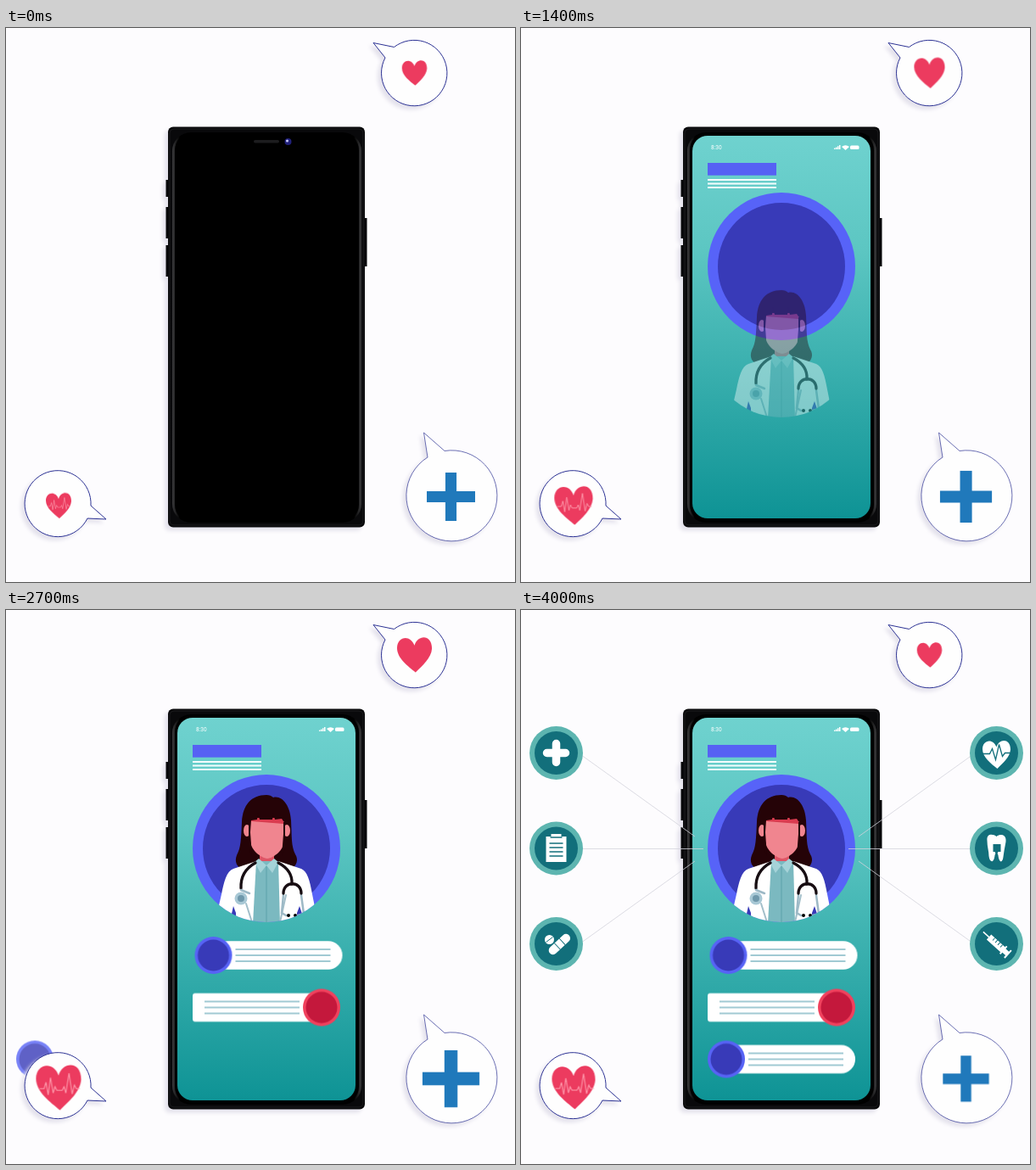
Recreate the animation shown at these times as an HTML page. Size 600 by 653 pixels, loop 4100 ms.

```html
<!DOCTYPE html>
<html lang="en">
<head>
<meta charset="utf-8">
<title>Health app</title>
<style>
  html, body { margin: 0; width: 100%; height: 100%; overflow: hidden; background: #fdfcfe; }
  svg { display: block; width: 600px; height: 653px; }
  .shade { filter: drop-shadow(-4px 4px 2px #e4e2ec); }
  .bubble { fill: #fefefe; stroke: #2b3193; stroke-linejoin: round; }
  .heart { fill: #ec3b5f; }
  .rule { fill: none; stroke: #4595a8; stroke-width: 1.2; }
  .rays { stroke: #d3d3dc; stroke-width: .8; }
  .white { fill: #fff; }
  .ring { fill: #5db5b0; }
  .core { fill: #126f7b; }
  .cut { fill: none; stroke: #126f7b; }
  .hair { fill: #250307; }
</style>
</head>
<body>
<svg viewBox="0 0 600 653">
  <defs>
    <linearGradient id="sea" x2="0" y2="1">
      <stop stop-color="#6fd2cf"/>
      <stop offset=".3" stop-color="#5cc6c2"/>
      <stop offset="1" stop-color="#0e9395"/>
    </linearGradient>
    <linearGradient id="rim">
      <stop stop-color="#3a3a3c"/>
      <stop offset=".04" stop-color="#000"/>
      <stop offset=".96" stop-color="#000"/>
      <stop offset="1" stop-color="#3a3a3c"/>
    </linearGradient>
    <clipPath id="disc"><circle cx="307" cy="281" r="87"/></clipPath>
    <path id="heart" d="M3 50C-18 32-50 10-50-20C-50-53-12-60 0-27C7-57 50-62 50-18C48 10 22 31 3 50Z"/>
  </defs>

  <!-- Phone -->
  <g class="shade">
    <path d="M188.500 179h5v20h-5zM188.500 211h5v37h-5zM188.500 256h5v37h-5zM421 224h4.500v57h-4.500z" fill="#08080a"/>
    <rect x="191" y="116.500" width="232" height="472" rx="6" fill="#09090b"/>
  </g>
  <rect x="193" y="119" width="228" height="467" rx="5" fill="none" stroke="#1c1c1e"/>
  <rect x="196" y="123" width="223" height="460" rx="22" fill="url(#rim)"/>
  <rect x="199" y="124" width="217" height="458" rx="20"/>
  <rect x="292" y="132" width="30" height="3.500" rx="1.700" fill="#1d1d1f"/>
  <circle cx="332.500" cy="134" r="4" fill="#20207a"/>
  <circle cx="331.500" cy="133" r="1.500" fill="#c9cbff"/>

  <g id="screen">
    <rect x="202" y="127" width="210" height="451" rx="18" fill="url(#sea)"/>
    <text x="224" y="143.300" font-family="Roboto, sans-serif" font-size="6.500" class="white">8:30</text>
    <path class="white" d="M369 143v-1.500h1.500v1.500zM371 143v-2.500h1.500v2.500zM373 143v-3.700h1.500v3.700zM375 143v-5h1.500v5zM378 140q4.500-3.500 9 0l-4.500 4z"/>
    <rect class="white" x="388" y="138.500" width="10.500" height="4.500" rx="1.500"/>
  </g>
  <g transform="translate(220 0)"><g id="title">
    <rect y="159" width="81" height="14.700" fill="#5661f4"/>
    <path d="M0 179h81M0 183.500h81M0 188h81" stroke="#f4fdfd" stroke-width="1.900"/>
  </g></g>

  <g transform="translate(307 281)"><g id="halo">
    <circle r="87" fill="#5763f8"/>
    <circle r="75" fill="#383ab8"/>
  </g></g>

  <g id="doctor"><g clip-path="url(#disc)">
    <path class="hair" d="M307 218C289 218 279 230 278 250C277 270 277 280 272 289C269 297 272 303 280 306H336C343 301 345 294 341 288C336 278 337 268 336 248C335 230 325 218 315 221Q312 218 307 218Z"/>
    <path fill="#df5566" d="M299 280h17v18l-9 10-8-10z"/>
    <g fill="#f0858f">
      <ellipse cx="284" cy="260" rx="4" ry="7"/><ellipse cx="331" cy="260" rx="4" ry="7"/>
      <path d="M288 245H328V273C327 283 316 292 308 293C300 292 289 283 288 273Z"/>
    </g>
    <path fill="#da3c50" d="M289 245h38v7l-38-3z"/>
    <path class="hair" d="M280 249C279 228 292 221 307 221C324 221 335 230 335 249L327 249 325 246 317 247 315 239 314 247 299 247 297 239 296 247 289 248 288 262 290 290 286 282 286 252ZM327 248l2 5v29l-4 8 2-26z"/>
    <path class="white" d="M295 296L268 305C260 308 257 320 254 335L246 370H368L361 335C358 318 355 308 348 305L321 296Z"/>
    <path fill="#7bb9c0" d="M295 296H321L323 370H291Z"/>
    <path fill="#a5d3d8" d="M298 293l9 8-7 9-7-13zM316 293l-9 8 7 9 7-13z"/>
    <path d="M307 302V368" stroke="#5da1aa" fill="none"/>
    <path d="M268 349l3 8v8l-5-7zM346 349l-3 8v8l6-7z" fill="#383ab8"/>
    <g fill="none" stroke-linecap="round">
      <path d="M283 346L290 368M330 336L323 368" stroke="#a3bfca" stroke-width="2"/>
      <path d="M294 298Q276 308 277 328M321 298Q338 307 337 323" stroke="#170d12" stroke-width="3.300"/>
      <path d="M277 330L287 334M327 336L325 357 330 360M348 336L351 358 344 360" stroke="#9db9c6" stroke-width="2.500"/>
      <path d="M327 334C327 319 348 319 348 334" stroke="#170d12" stroke-width="3.300"/>
    </g>
    <circle cx="277" cy="340" r="7.500" fill="#a8c8d5"/>
    <circle cx="277" cy="340" r="4" fill="#6f98ab"/>
    <circle cx="333" cy="360" r="2"/><circle cx="341" cy="360" r="2"/>
  </g></g>

  <g id="rows"></g>

  <path id="rays" class="rays" d="M60 163L205 267M60 400L205 296M543 163L398 267M543 400L398 296M58 281.500H215M386 281.500H543"/>
  <g transform="translate(301 281)"><g id="icons"></g></g>

  <!-- Bubbles -->
  <g class="shade">
    <path class="bubble" d="M447 35L433 17.500 457.500 22.500A38.700 38.700 0 1 1 447 35Z"/>
    <path class="bubble" d="M100 563L118 579 96 578A39 39 0 1 1 100 563Z"/>
    <path class="bubble" stroke-width=".7" d="M497 506L492.500 477 517 498.500A53.500 53.500 0 1 1 497 506Z"/>
  </g>
  <g transform="translate(481.500 53)"><use id="love" href="#heart" class="heart"/></g>
  <g transform="translate(62 563)"><g id="pulse">
    <use href="#heart" class="heart"/>
    <path d="M-42 2h10l4-14 5 28 5-38 6 34 4-14 4 8h12l4-8 4 14 7-44 7 46 5-20 4 8h8" fill="none" stroke="#ff9fb0" stroke-width="2"/>
  </g></g>
  <g transform="translate(524.500 552.500)"><path id="plus" fill="#2079bb" d="M-50-11.500h38.500V-50h23v38.500H50v23H11.500V50h-23V11.500H-50z"/></g>
</svg>

<script>
const LOOP = 4100;
const $ = id => document.getElementById(id);
const sine = 'cubic-bezier(.37, 0, .63, 1)';

// Steps are [ms, properties]; the first and last hold to the ends of the loop.
function play(el, steps, easing = 'linear') {
  const all = [[0, steps[0][1]], ...steps, [LOOP, steps.at(-1)[1]]];
  el.animate(all.map(([ms, props]) => ({ offset: ms / LOOP, easing, ...props })),
    { duration: LOOP, iterations: Infinity });
}
const fade = (el, from, to) => play(el, [[from, { opacity: 0 }], [to, { opacity: 1 }]]);
const move = (el, from, to, a, b, easing) =>
  play(el, [[from, { transform: a }], [to, { transform: b }]], easing);
const swell = (el, points) =>
  play(el, points.map(([ms, size]) => [ms, { transform: `scale(${size / 100})` }]), sine);

// Chat rows
const blue = ['#5763f5', '#383ab8'], red = ['#f0415d', '#c4183c'];
const rows = [
  { x: 244.5, y: 407, dir: 1, shift: -180, start: 1650, round: 16.5, tint: blue },
  { x: 372, y: 468.5, dir: -1, shift: 160, start: 2150, round: 3, tint: red },
  { x: 242, y: 529.5, dir: 1, shift: -208, start: 2600, round: 16.5, tint: blue }
];
$('rows').innerHTML = rows.map(r => `<g transform="translate(${r.x} ${r.y})">
  <rect class="white" x="${r.dir < 0 ? -152 : 0}" y="-16.700" width="152" height="33.400" rx="${r.round}"/>
  <path class="rule" d="${[-7, 0, 7].map(y => `M${26 * r.dir} ${y}H${138 * r.dir}`).join('')}"/>
  <g><circle r="22" fill="${r.tint[0]}"/><circle r="18.500" fill="${r.tint[1]}"/></g></g>`).join('');
rows.forEach((r, i) => {
  const [pill, lines, dot] = $('rows').children[i].children;
  const s = r.start, at = x => `translateX(${x}px)`;
  play(dot, [
    [s, { opacity: 0, transform: at(r.shift) }],
    [s + 100, { opacity: .8, transform: at(r.shift) }],
    [s + 280, { opacity: 1, transform: at(0) }]
  ], sine);
  fade(pill, s + 200, s + 230);
  move(pill, s + 200, s + 350, 'scaleX(.1)', 'scaleX(1)');
  fade(lines, s + 350, s + 500);
});

// Service icons
const glyphs = [
  '<path d="M-11 0H11M0-11V11" stroke="#fff" stroke-width="9.500" stroke-linecap="round"/>',
  '<path class="white" d="M-12-14h6v-3H6v3h6v30h-24z"/><path class="cut" d="M-7-13H7M-8-6H8M-8-1H8M-8 4H8M-8 9H8" stroke-width="1.300"/>',
  '<g transform="rotate(-43)"><rect class="white" x="-13" y="-2" width="31" height="10" rx="5"/><path class="cut" d="M-1-2v10M7-2v10"/></g><circle class="white" cx="-8" cy="-5" r="5.500"/><path class="cut" d="M-12-2l8-6"/>',
  '<use href="#heart" class="white" transform="translate(0 2) scale(.33)"/><path class="cut" stroke-width="1.300" d="M-17 1h9l3-6 4 13 4-18 4 14 3-4h7"/>',
  '<path class="white" d="M-11-9C-12-18-4-17 0-14C5-18 12-16 11-8C10-2 9 2 8 10C7 18 3 17 2 8Q0 2-2 8C-3 18-8 17-9 9C-9 3-11-2-11-9Z"/><path class="core" d="M-4-5H5V4H2L0 8-2 4H-4z"/>',
  '<g transform="rotate(42)"><path class="white" d="M-21-.8h9v-3.200h22v-2h2v3h5v-3h2v12h-2v-3h-5v3h-2v-2h-22v-3.200h-9z"/><path class="cut" d="M-6-4v4M-2-4v4M2-4v4M6-4v4"/></g>'
];
$('icons').innerHTML = glyphs.map((glyph, i) => {
  const x = i < 3 ? -259.5 : 259.5, y = (i % 3 - 1) * 112.5;
  return `<g transform="translate(${x} ${y})"><circle class="ring" r="31.500"/><circle class="core" r="25.500"/>${glyph}</g>`;
}).join('');

fade($('screen'), 100, 500);
fade($('title'), 500, 600);
move($('title'), 500, 800, 'scaleX(0)', 'scaleX(1)', 'ease-out');
fade($('halo'), 900, 1060);
move($('halo'), 900, 1300, 'scale(0)', 'scale(1)', 'cubic-bezier(.2, .4, .5, 1)');
play($('doctor'), [[1300, { opacity: 0 }], [1400, { opacity: .4 }], [1600, { opacity: 1 }]]);
move($('doctor'), 1300, 1800, 'translateY(132px)', 'translateY(0)', 'ease-out');
fade($('rays'), 3000, 3200);
play($('icons'), [[3000, { opacity: 0 }], [3100, { opacity: .35 }], [3350, { opacity: 1 }]]);
move($('icons'), 3000, 3900, 'scale(0)', 'scale(1)', 'cubic-bezier(.25, 1, .5, 1)');

// Beating shapes: [ms, width]
swell($('love'), [...Array(11).keys()].map(k => [k * 400, k % 2 ? 43 : 29.5]));
swell($('pulse'), [[0, 30], [250, 53], [600, 44], [1000, 53.5], [1460, 45], [1800, 53.5], [2200, 44],
  [2650, 53.5], [3100, 44], [3500, 53], [3800, 45], [4100, 53]]);
swell($('plus'), [[0, 57], [340, 78], [1000, 40], [1762, 79], [2299, 40], [2940, 79], [3720, 40], [4100, 57]]);
</script>
</body>
</html>
```
